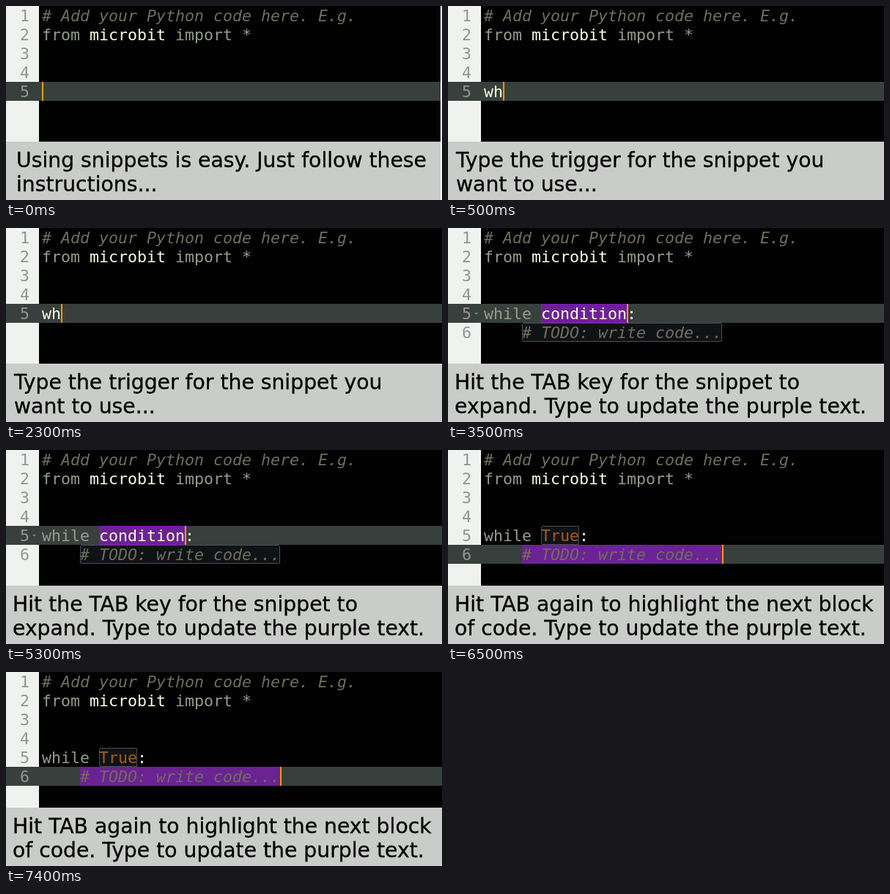
An HTML page with a canvas that plays this animation: 595x266 px, repeating every 8000 ms.

```html
<!DOCTYPE html>
<html lang="en">
<head>
<meta charset="utf-8">
<title>Using snippets</title>
<style>
  html, body { margin: 0; width: 100%; height: 100%; overflow: hidden; background: #fff; }
  canvas { display: block; }
</style>
</head>
<body>
<canvas id="stage" width="595" height="266"></canvas>
<script>
const ctx = document.getElementById('stage').getContext('2d');
const ROW = 26, CHAR = 13, LEFT = 49, GUTTER = 45, LOOP = 8000;
const MONO = '21.6px "DejaVu Sans Mono", monospace';
const SANS = '28.25px "DejaVu Sans", sans-serif';
const color = {
  text: '#fcffe0', keyword: '#949c8b', comment: '#706d5b', constant: '#a65c13',
  active: '#38403d', selection: '#6b2394', caret: '#ff9900',
};
const TODO = '# TODO: write code...';

// code: [row, column, text, color]; select, word and marker: [row, column, length]; caret: [row, column]
const scenes = [
  { start: 0, width: 593, rows: 5, caret: [4, 0], code: [],
    captionX: 14, caption: ['Using snippets is easy. Just follow these', 'instructions...'] },
  { start: 500, rows: 5, caret: [4, 2], code: [[4, 0, 'wh', 'text']],
    captionX: 11, caption: ['Type the trigger for the snippet you', 'want to use...'] },
  { start: 3500, rows: 6, caret: [4, 15], select: [4, 6, 9], word: [4, 6, 9], marker: [5, 4, 21], fold: true,
    code: [[4, 0, 'while', 'keyword'], [4, 6, 'condition:', 'text'], [5, 4, TODO, 'comment']],
    captionX: 9, caption: ['Hit the TAB key for the snippet to', 'expand. Type to update the purple text.'] },
  { start: 6500, rows: 6, caret: [5, 25], select: [5, 4, 21], marker: [4, 6, 4],
    code: [[4, 0, 'while', 'keyword'], [4, 6, 'True', 'constant'], [4, 10, ':', 'text'], [5, 4, TODO, 'comment']],
    captionX: 9, caption: ['Hit TAB again to highlight the next block', 'of code. Type to update the purple text.'] },
];
const header = [
  [0, 0, '# Add your Python code here. E.g.', 'comment'],
  [1, 0, 'from', 'keyword'], [1, 5, 'microbit', 'text'], [1, 14, 'import *', 'keyword'],
];

const columnX = column => LEFT + column * CHAR;
const span = ([row, column, length]) => [columnX(column), row * ROW, length * CHAR, ROW];

function rect(x, y, w, h, fill) {
  ctx.fillStyle = fill;
  ctx.fillRect(x, y, w, h);
}

function text(string, x, y, font, fill) {
  ctx.font = font;
  ctx.fillStyle = fill;
  ctx.fillText(string, x, y);
}

// Rounded box with a dotted border
function drawMarker([x, y, w, h]) {
  const dot = 'rgba(211, 208, 235, 0.62)';
  ctx.beginPath();
  ctx.roundRect(x, y, w, h, 3);
  ctx.fillStyle = 'rgba(150, 185, 225, 0.09)';
  ctx.fill();
  for (let i = 2; i < w - 1; i += 2) {
    rect(x + i, y, 1, 1, dot);
    rect(x + i, y + h - 1, 1, 1, dot);
  }
  for (let i = 2; i < h - 1; i += 2) {
    rect(x, y + i, 1, 1, dot);
    rect(x + w - 1, y + i, 1, 1, dot);
  }
}

function drawWordBorder([x, y, w, h]) {
  ctx.strokeStyle = 'rgba(170, 0, 255, 0.45)';
  ctx.lineWidth = 1;
  ctx.strokeRect(x + 0.5, y + 0.5, w - 1, h - 1);
}

function drawCaption(line, x, y) {
  text(line, x, y, SANS, '#000');
  ctx.strokeStyle = '#000';
  ctx.lineWidth = 0.3;
  ctx.strokeText(line, x, y);
}

function draw(scene) {
  const width = scene.width || 595;
  const [caretRow, caretColumn] = scene.caret;
  rect(0, 0, 595, 266, '#fff');
  rect(0, 0, width, 186, '#010201');
  rect(0, 0, GUTTER, 186, '#f0f2ef');
  rect(0, caretRow * ROW, width, ROW, color.active);
  rect(0, 186, width, 80, '#caccc9');

  if (scene.marker) drawMarker(span(scene.marker));
  if (scene.select) rect(...span(scene.select), color.selection);
  if (scene.word) drawWordBorder(span(scene.word));
  for (let row = 0; row < scene.rows; row++) {
    text(row + 1, 19, row * ROW + 21, MONO, '#939591');
  }
  for (const [row, column, string, kind] of [...header, ...scene.code]) {
    const font = kind === 'comment' ? 'italic ' + MONO : MONO;
    text(string, columnX(column), row * ROW + 21, font, color[kind]);
  }
  if (scene.fold) {
    ctx.fillStyle = '#777d79';
    ctx.beginPath();
    ctx.moveTo(36, 116);
    ctx.lineTo(41, 116);
    ctx.lineTo(38.5, 119);
    ctx.fill();
  }
  rect(columnX(caretColumn), caretRow * ROW, 2, ROW, color.caret);
  scene.caption.forEach((line, i) => drawCaption(line, scene.captionX, 221 + i * 33));
}

function frame() {
  const time = performance.now() % LOOP;
  draw(scenes.findLast(scene => scene.start <= time));
  requestAnimationFrame(frame);
}
frame();
</script>
</body>
</html>
```
